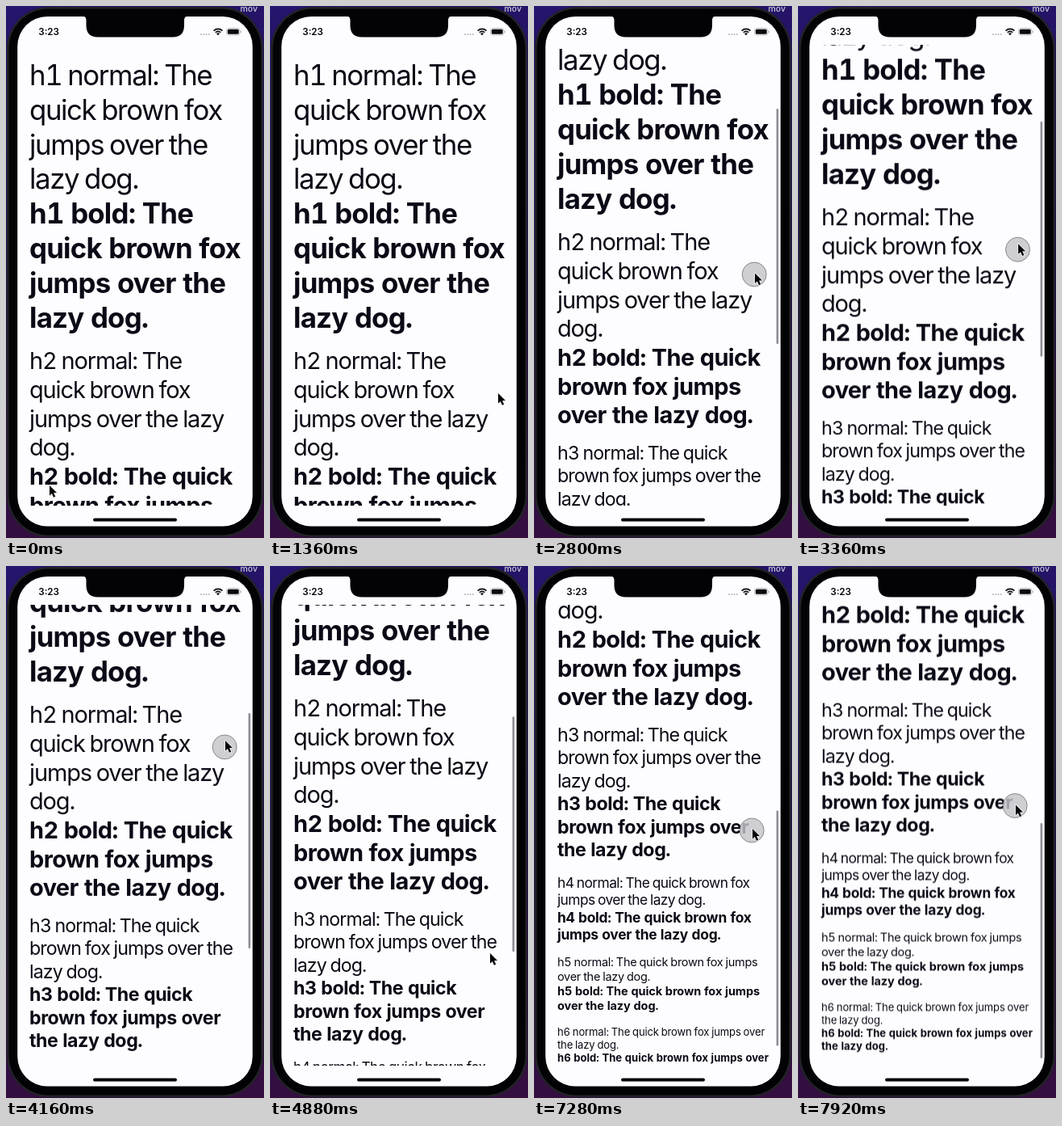
These frames come from a looping animation (320 px wide and 658 px high, 8000 ms). An HTML page with a canvas:

```html
<!DOCTYPE html>
<html lang="en">
<head>
<meta charset="utf-8">
<title>Heading scale</title>
<style>
  html, body { margin: 0; width: 100%; height: 100%; overflow: hidden; background: #24103f; }
  #stage { position: relative; width: 320px; height: 658px; overflow: hidden; }
  canvas { position: absolute; left: 0; top: 0; width: 320px; height: 658px; }
  #view { position: absolute; left: 14px; top: 48px; width: 292px; height: 570px; overflow: hidden; }
  #text {
    position: absolute; left: 14.6px; top: 17px; color: #0a0a16;
    font-family: Inter, "Liberation Sans", Arial, sans-serif;
    font-optical-sizing: none; font-variant-numeric: tabular-nums;
    white-space: pre; will-change: transform;
  }
  #text section { margin-bottom: 14.9px; }
  #text p { position: relative; top: -0.025em; margin: 0; word-spacing: -0.03em; }
  #text p.bold { font-weight: 700; word-spacing: 0; }
</style>
</head>
<body>
<div id="stage">
  <canvas id="phone"></canvas>
  <div id="view"><div id="text"></div></div>
  <canvas id="overlay"></canvas>
</div>
<script>
const W = 320, H = 658, LOOP = 8000, LAG = 80;
const INK = '#07070c', PAPER = '#fdfdff', GREY = '#b4b4bc';

// size, tracking (normal, bold), words per line (normal, bold)
const LEVELS = [
  [35.85, -0.040, -0.022, '3332', '3332'],
  [29.88, -0.039, -0.021, '3341', '434'],
  [23.90, -0.039, -0.019, '452', '443'],
  [17.93, -0.035, -0.014, '65', '65'],
  [14.94, -0.020, -0.005, '74', '74'],
  [13.45, -0.011, 0.004, '83', '83']
];

// pointer path: time, x, y
const PATH = [
  [0, 54, 593], [450, 54, 593], [1350, 283, 479], [1480, 283, 479],
  [2080, 281, 415.5], [2160, 281, 411], [2720, 274, 332], [2800, 274, 330.5],
  [4080, 272, 224], [4160, 272, 216], [4340, 272, 216], [4850, 273, 479],
  [4960, 273, 479], [5760, 274, 332], [6040, 274, 332], [6500, 271, 408],
  [6600, 271, 408], [7200, 271, 327], [7280, 271, 325], [7840, 270, 296.5],
  [8000, 270, 295]
];

// touch start, touch end, content position under the finger
const DRAGS = [[1440, 4320, 479], [4900, 5860, 742], [6550, LOOP, 818]];

function setup(id) {
  const c = document.getElementById(id), k = window.devicePixelRatio || 1;
  c.width = W * k;
  c.height = H * k;
  const g = c.getContext('2d');
  g.scale(k, k);
  return g;
}

function box(g, x, y, w, h, r, fill) {
  g.beginPath();
  g.roundRect(x, y, w, h, r);
  g.fillStyle = fill;
  g.fill();
}

function buildText() {
  const root = document.getElementById('text');
  LEVELS.forEach(([size, trackN, trackB, linesN, linesB], i) => {
    const section = document.createElement('section');
    [['normal', trackN, linesN], ['bold', trackB, linesB]].forEach(([kind, track, lines]) => {
      const words = `h${i + 1} ${kind}: The quick brown fox jumps over the lazy dog.`.split(' ');
      const p = document.createElement('p');
      p.className = kind;
      p.style.fontSize = size * 0.97 + 'px';
      p.style.lineHeight = size * 1.193 + 'px';
      p.style.letterSpacing = track + 'em';
      p.textContent = [...lines].map(n => words.splice(0, +n).join(' ')).join('\n');
      section.append(p);
    });
    root.append(section);
  });
  return root;
}

function drawStatus(g) {
  g.fillStyle = INK;
  g.font = '600 11.6px Inter, "Liberation Sans", sans-serif';
  g.fillText('3:23', 40.3, 36);

  g.fillStyle = GREY;
  for (let i = 0; i < 4; i++) {
    g.beginPath();
    g.arc(242 + i * 3.2, 35, 1, 0, 7);
    g.fill();
  }

  g.strokeStyle = INK;
  g.lineWidth = 1.7;
  for (const r of [4.6, 7.6]) {
    g.beginPath();
    g.arc(263, 36, r, -Math.PI * 0.75, -Math.PI * 0.25);
    g.stroke();
  }
  g.beginPath();
  g.moveTo(263, 36.3);
  g.arc(263, 36.3, 2.8, -Math.PI * 0.75, -Math.PI * 0.25);
  g.fillStyle = INK;
  g.fill();

  g.beginPath();
  g.roundRect(273.5, 27.5, 16.5, 8.5, 2.6);
  g.strokeStyle = GREY;
  g.lineWidth = 0.8;
  g.stroke();
  box(g, 274.8, 28.8, 13.9, 5.9, 1.5, INK);
  box(g, 290.9, 30.4, 1.2, 2.8, 0.6, GREY);
}

function drawPhone(g) {
  const sky = g.createLinearGradient(0, 0, W * 0.4, H);
  sky.addColorStop(0, '#26146e');
  sky.addColorStop(0.6, '#241048');
  sky.addColorStop(1, '#340e40');
  g.fillStyle = sky;
  g.fillRect(0, 0, W, H);

  g.fillStyle = '#cfcbdc';
  g.font = '500 10.5px Inter, "Liberation Sans", sans-serif';
  g.fillText('mov', 290.5, 7);

  box(g, 1, 1, 318, 656, 52, '#222228');
  box(g, 3.5, 3.5, 313, 651, 49.5, '#030305');
  box(g, 14.2, 13, 291.6, 630.6, 37, PAPER);

  g.beginPath();
  g.moveTo(95, 12.5);
  g.quadraticCurveTo(99.5, 13, 99.5, 17.5);
  g.lineTo(99.5, 24);
  g.quadraticCurveTo(99.5, 38.5, 114, 38.5);
  g.lineTo(206.5, 38.5);
  g.quadraticCurveTo(221, 38.5, 221, 24);
  g.lineTo(221, 17.5);
  g.quadraticCurveTo(221, 13, 225.5, 12.5);
  g.closePath();
  g.fillStyle = '#030305';
  g.fill();

  drawStatus(g);
  box(g, 108, 633.5, 104, 4, 2, INK);
}

// monotone cubic through the path
function slope(i, c) {
  if (i <= 0 || i >= PATH.length - 1) return 0;
  const [a, b, d] = [PATH[i - 1], PATH[i], PATH[i + 1]];
  const m = (b[c] - a[c]) / (b[0] - a[0]), n = (d[c] - b[c]) / (d[0] - b[0]);
  return m * n > 0 ? 2 * m * n / (m + n) : 0;
}

function along(t, c) {
  t = Math.max(0, Math.min(LOOP, t));
  let i = 0;
  while (i < PATH.length - 2 && PATH[i + 1][0] <= t) i++;
  const a = PATH[i], b = PATH[i + 1], d = b[0] - a[0], u = (t - a[0]) / d;
  const u2 = u * u, u3 = u2 * u;
  return (2 * u3 - 3 * u2 + 1) * a[c] + (3 * u2 - 2 * u3) * b[c] +
    d * ((u3 - 2 * u2 + u) * slope(i, c) + (u3 - u2) * slope(i + 1, c));
}

function drawTouch(g, x, y) {
  g.beginPath();
  g.arc(x, y, 15, 0, 7);
  g.fillStyle = 'rgba(196,196,201,0.82)';
  g.fill();
  g.strokeStyle = 'rgba(112,112,120,0.8)';
  g.lineWidth = 1;
  g.stroke();
}

function drawPointer(g, x, y) {
  g.save();
  g.translate(x, y);
  g.beginPath();
  [[0, 0], [0, 12.6], [2.9, 10], [5, 14.8], [7.2, 13.8], [5.1, 9.1], [9, 9]]
    .forEach(p => g.lineTo(...p));
  g.closePath();
  g.lineJoin = 'round';
  g.strokeStyle = '#f4f4f8';
  g.lineWidth = 1.6;
  g.stroke();
  g.fillStyle = '#030305';
  g.fill();
  g.restore();
}

const text = buildText();
const top2d = setup('overlay');
drawPhone(setup('phone'));

function render(t) {
  const touch = t - LAG;
  const drag = DRAGS.filter(d => d[0] <= touch).pop();
  const scroll = drag ? drag[2] - along(Math.min(touch, drag[1]), 2) : 0;
  text.style.transform = `translateY(${-scroll}px)`;

  top2d.clearRect(0, 0, W, H);
  if (scroll > 0) box(top2d, 300.6, 52 + scroll * 0.51, 2.6, 291, 1.3, 'rgba(84,84,96,0.66)');
  if (drag && touch < drag[1]) drawTouch(top2d, along(touch, 1) - 0.8, along(touch, 2));
  drawPointer(top2d, along(t, 1), along(t, 2));
}

const start = performance.now();
function tick() {
  render((performance.now() - start) % LOOP);
  requestAnimationFrame(tick);
}
tick();
</script>
</body>
</html>
```
